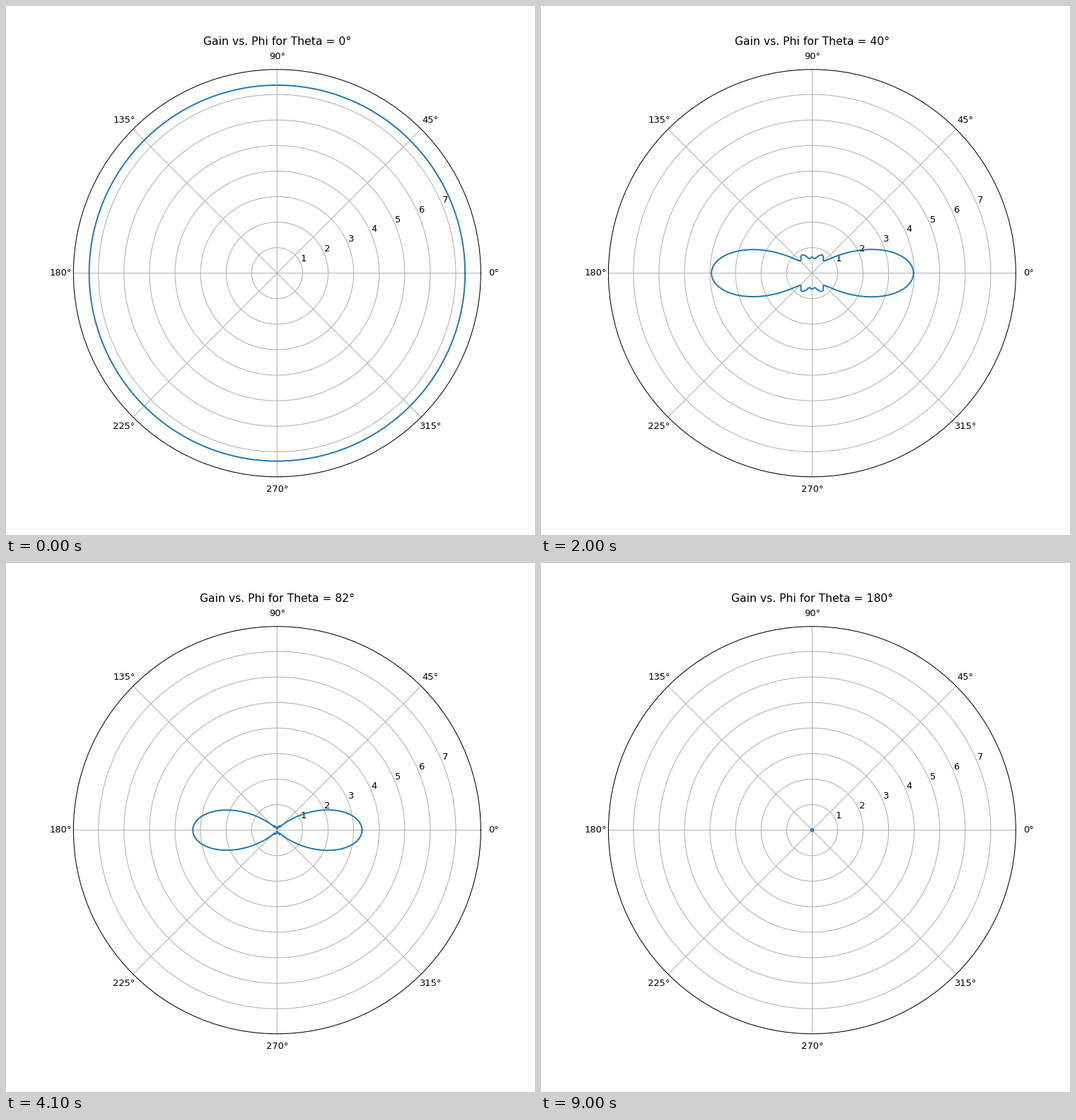
Animation of 748x748 px, one loop 9100 ms. Source, as a matplotlib script:

```python
import numpy as np
import matplotlib.pyplot as plt
from matplotlib.animation import FuncAnimation

STEP = 2            # degrees of theta per frame
FRAMES = 91
ZENITH = 7.365      # gain straight up
PEAK = 7.98         # gain of the tilted lobes
PEAK_THETA = 56

phi = np.radians(np.arange(0, 361, 2))
fold = np.degrees(np.arcsin(np.abs(np.sin(phi))))   # angle from the 0-180 axis


def bump(x, center, width):
    return np.exp(-((x - center) / width) ** 2)


def lobe_level(theta):
    """Squared-cosine rise to the peak, then a Lorentzian fall that cuts off."""
    d = theta - PEAK_THETA
    if d < 0:
        return np.cos(np.pi / 2 * min(-d / 33.5, 1)) ** 2
    return 1 / (1 + (d / 22) ** 2) / (1 + np.exp((theta - 138) / 5))


def gain(theta):
    x2 = (theta / 22) ** 2
    broad = ZENITH * bump(theta, 0, 21.7) * (
        1 - 0.47 * x2 * np.cos(2 * phi) - 0.195 * x2 * np.cos(4 * phi))

    level = lobe_level(theta)
    power = 2.3 - 0.35 * bump(theta, 86, 18)
    beam = np.cos(np.radians(np.minimum(1.7 * fold, 90))) ** power
    side = 0.8 * bump(fold, 60, 16) + 0.4 * bump(fold, 90, 8)
    tilt = 1 + 0.0035 * (np.cos(phi) - 1)

    lobes = PEAK * level * beam * tilt + level ** 1.6 * side
    return np.maximum(broad + lobes, 0.05)


fig = plt.figure(figsize=(8, 8), dpi=93.5)
ax = fig.add_subplot(projection="polar")
line, = ax.plot(phi, gain(0))
ax.set_ylim(0, PEAK)
ax.set_yticks(range(1, 8))
plt.setp(ax.get_xgridlines(), snap=False)
title = ax.set_title("Gain vs. Phi for Theta = 0°", pad=7.5)


def update(i):
    theta = i * STEP
    line.set_ydata(gain(theta))
    title.set_text(f"Gain vs. Phi for Theta = {theta}°")
    return line, title


anim = FuncAnimation(fig, update, frames=FRAMES, interval=100, repeat=True,
                     repeat_delay=0, blit=False)
plt.show()
```
